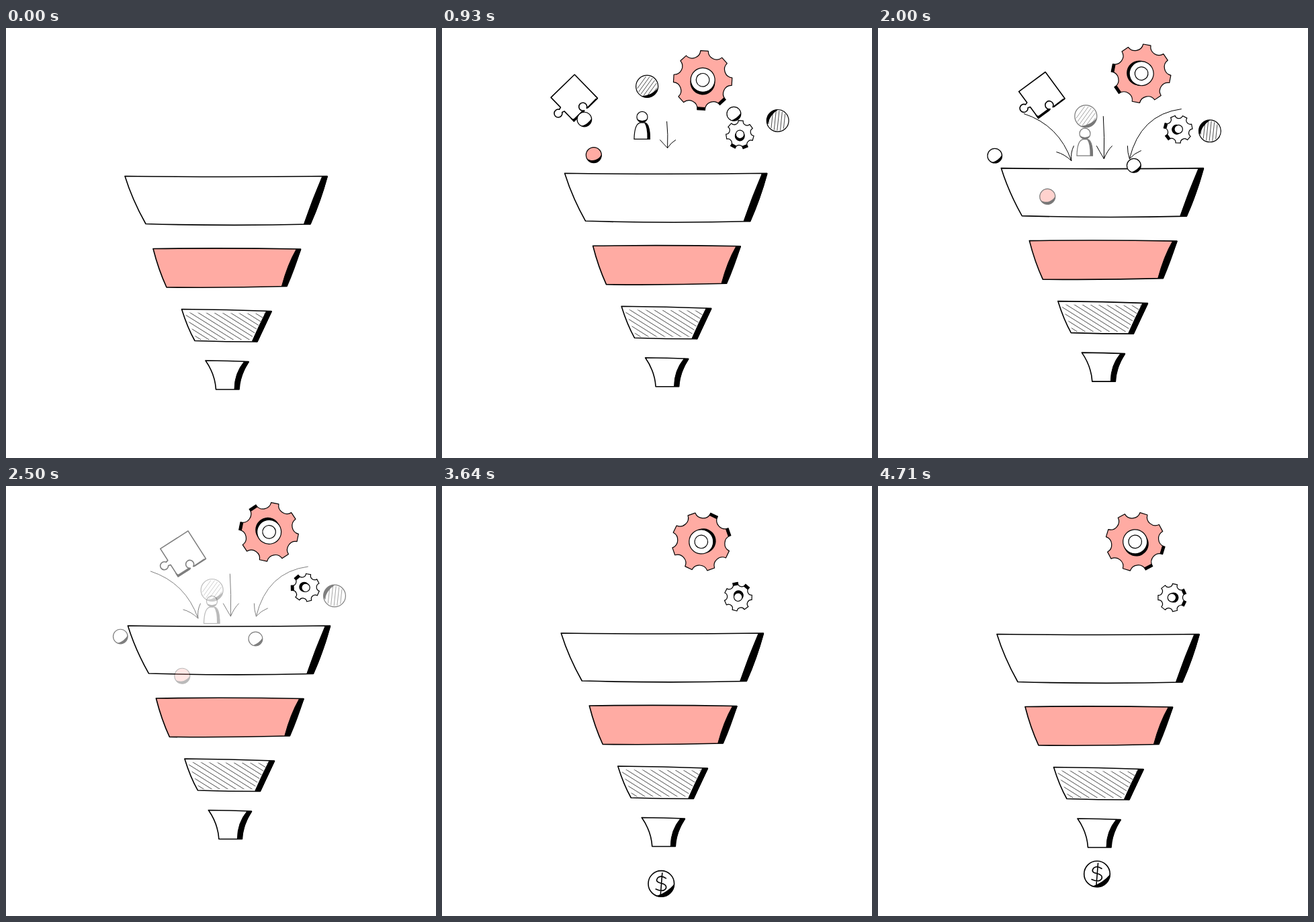
Recreate the animation shown at these times as an HTML page. Size 640 by 640 pixels, loop 4.78 s.

```html
<!DOCTYPE html>
<html lang="en">
<head>
<meta charset="utf-8">
<title>Funnel</title>
<style>
  html, body { margin: 0; width: 100%; height: 100%; overflow: hidden; background: #fff; }
  svg { display: block; width: 100%; height: 100%; }
  .line { fill: none; stroke: #000; stroke-width: 1.2; stroke-linecap: round; stroke-linejoin: round; }
  .white { fill: #fff; }
  .pink { fill: #ffaba3; }
  .black { fill: #000; }
  .bold { stroke-width: 1.6; }
  .fine { stroke-width: 1; }
  .thin { stroke-width: .7; }
</style>
</head>
<body>
<svg viewBox="0 0 640 640" xmlns="http://www.w3.org/2000/svg">
  <clipPath id="hatchArea"><path d="M266 423.5L385 425L364.5 464H284Z"/></clipPath>
  <g id="scene"></g>
</svg>
<script>
const LOOP = 4780, STEP = LOOP / 67, FALL = 3000;
const scene = document.getElementById('scene');
const rad = deg => deg * Math.PI / 180;
const polar = (r, deg) => `${(r * Math.cos(rad(deg))).toFixed(2)} ${(r * Math.sin(rad(deg))).toFixed(2)}`;
const ramp = (t, a, b) => Math.max(0, Math.min(1, (t - a) / (b - a)));
const mix = (a, b, u) => a + (b - a) * u;
const easeInOut = u => (1 - Math.cos(Math.PI * u)) / 2;
const easeOut = u => 1 - (1 - u) ** 2;

// ---- drawing helpers ----
const path = (d, cls = '') => `<path class="${cls}" d="${d}"/>`;
const line = (d, cls = '') => path(d, 'line ' + cls);
const circle = (r, cls, x = 0, y = 0) => `<circle class="${cls}" cx="${x}" cy="${y}" r="${r}"/>`;

// Shadow between a rim arc and a flatter inner arc.
function crescent(r, a0, a1, flat = 2.5) {
  const p = polar(r, a0), q = polar(r, a1), R = r * flat;
  return path(`M${p}A${r} ${r} 0 0 1 ${q}A${R} ${R} 0 0 0 ${p}Z`);
}

function chords(r, deg, gap) {
  const c = Math.cos(rad(deg)), s = Math.sin(rad(deg));
  let d = '';
  for (let o = -r + gap; o < r; o += gap) {
    const half = Math.sqrt(r * r - o * o);
    d += `M${-o * s - half * c} ${o * c - half * s}L${-o * s + half * c} ${o * c + half * s}`;
  }
  return line(d, 'thin');
}

const ball = (r, cls, a0, a1, flat, hatch = '') =>
  circle(r, 'line ' + cls) + hatch + crescent(r, a0, a1, flat);

// The shaded side faces angle 0; the wheel sits slightly off its pivot.
function gear(teeth, r, half, notch, cls, hub, lean) {
  const pitch = 360 / teeth;
  let d = '', shade = '';
  for (let i = 0; i <= teeth; i++) {
    const a = (i + .5) * pitch;
    d += (i ? `A${notch} ${notch} 0 0 0 ` : 'M') + polar(r, a - half) + 'L' + polar(r, a + half);
  }
  for (const a of [-pitch / 2, pitch / 2]) {
    const lo = r - 2.5, hi = r + 1.2;
    shade += line(`M${polar(lo, a - half)}L${polar(hi, a - half)}L${polar(hi, a + half)}L${polar(lo, a + half)}Z`, 'black');
  }
  return `<g transform="translate(${polar(2.5, lean)})">${line(d, cls)}${shade}${hub}</g>`;
}

const tier = (outline, band, cls, extra = '') =>
  line(outline, 'bold ' + cls) + extra + line(band, 'black fine');

function slant() {
  let d = '';
  for (let x = 184; x < 390; x += 12) d += `M${x} 420l80 50`;
  return `<g clip-path="url(#hatchArea)">${line(d, 'thin')}</g>`;
}

// ---- artwork ----
const funnelArt =
  tier('M177 220.5Q327 222.5 478 220.5Q468 258 453 292Q330 295 208 291.5Q188 256 177 220.5Z',
    'M470.5 221.5L478.5 221Q468 259 453 292L443.5 291.5Q456 255 470.5 221.5Z', 'white') +
  tier('M219 328.5Q328 327 438.5 329Q429 359 418 384.5Q328 387 239 386Q227 360 219 328.5Z',
    'M432 329.5L439 329.5Q428 358 417.5 384.5L410.5 384Q419 352 432 329.5Z', 'pink') +
  tier('M261.5 418.5Q328 419 395 421.5L374 467Q328 467 281 465.5Q270 446 261.5 418.5Z',
    'M387.5 421.5L395.5 422L374 467L366.5 466Q376 444 387.5 421.5Z', 'white', slant()) +
  tier('M297 495Q330 495 361 496.5Q348 517 347 538H312.5Q311 515 297 495Z',
    'M354.5 496.5L361.5 497Q348 517 346.5 537.5H340Q340 514 354.5 496.5Z', 'white');

const puzzleArt =
  line('M-24.5 -24.5H24.5V-3.5L24 -2.5A6 6 0 1 0 24 2.5L24.5 3.5V24.5H4L3 28A6 6 0 1 1 -3 28L-4 24.5H-24.5Z', 'white bold') +
  path('M22 4H25.5V25.5H18L22 22.5ZM23 -22L25.5 -24.5V-4H23.5Z');

const personArt =
  line('M-12 33Q-11.5 9 -2 8.5H4Q11.5 10 11.5 33Z', 'white') +
  path('M3 8.5Q11.5 10 12 33H7.5Q8 15 3 8.5Z') +
  ball(8, 'white', 25, 155, 1.8);

const bigHub = circle(18.5, 'black', 3.3, 1.4) + circle(18, 'line white') + circle(9.8, 'line white');
const smallHub = circle(7.5, 'black', 2.6, 0) + circle(6.2, 'line white');

const coinArt =
  circle(19.3, 'line white bold') + crescent(19.8, 0, 112, 3) +
  line('M1.5 -16L-1 16M7 -8Q0 -13 -5 -9Q-10 -3 -1 -1Q9 1 7 7Q3 13 -8 8', 'bold');

// ---- motion ----
function add(art) {
  const g = document.createElementNS('http://www.w3.org/2000/svg', 'g');
  g.innerHTML = art;
  return scene.appendChild(g);
}

function pose(g, x, y, more, alpha) {
  g.setAttribute('transform', `translate(${x} ${y}) ${more}`);
  g.setAttribute('opacity', alpha);
}

// The whole scene sways: up and right, then back down to rest at 4 s.
function sway(t) {
  const u = Math.min(t / 4000, 1);
  const lift = t < 2380 ? easeInOut(t / 2380) : easeInOut(1 - ramp(t, 2380, 4000));
  return [7.1 * Math.sin(Math.PI * u ** .72) ** 2, -12.7 * lift];
}

const bezier = (a, b, c, u) => mix(mix(a, b, u), mix(b, c, u), u);
const appear = t => ramp(t, 0, 300);
const movers = [];

// Drift along a straight or bent path, fading away before the fall ends.
function drift(art, fadeFrom, from, to, bend, turn = [0, 0]) {
  const g = add(art), mid = bend || from.map((v, i) => (v + to[i]) / 2);
  movers.push(t => {
    const u = Math.min(t / FALL, 1);
    const [x, y] = from.map((v, i) => bezier(v, mid[i], to[i], u));
    pose(g, x, y, `rotate(${mix(...turn, u)})`, appear(t) * (1 - ramp(t, fadeFrom, FALL)));
  });
}

function spin(art, x, y, start, speed, stop) {
  const g = add(art);
  movers.push(t => pose(g, x, y, `rotate(${start + speed * Math.min(t, stop)})`, appear(t)));
}

// Arrows stretch downwards from their tails.
function arrow(d, x, y, from) {
  const g = add(`<path class="line fine" vector-effect="non-scaling-stroke" d="${d}"/>`);
  movers.push(t => {
    const grow = ramp(t, from, from + 800);
    pose(g, x, y, `scale(1 ${Math.max(grow, .001)})`, grow ? 1 - ramp(t, LATE, FALL) : 0);
  });
}

const EARLY = 1100, LATE = 2000;

const coin = add(coinArt);
movers.push(t => {
  const y = mix(490, 597, easeOut(ramp(t, 2600, 3300))) - 19.5 * ramp(t, 3400, 4710);
  pose(coin, 326, y, '', ramp(t, 2600, 2860));
});

add(funnelArt);

arrow('M0 0Q2 30 1 63M-10 44Q-5 53 1 63Q6 51 13 44', 329, 143.5, 430);
arrow('M0 0Q52 17 70.5 70M48.500 57Q60 60 70.5 70Q69 58 74 48', 211, 139.5, 960);
arrow('M0 0Q-61 8 -77 74M-80 55Q-80 65 -77 74Q-70 66 -60 62', 445, 132.5, 1100);

drift(puzzleArt, LATE, [151, 105], [281, 115], null, [39, 61]);
drift(ball(10.8, 'white', -8, 112), LATE, [279, 100], [175, 275], [132, 155]);
drift(ball(11.5, 'pink', -5, 150, 1.3), EARLY, [198, 133], [270, 328]);
drift(ball(16.5, 'white', 10, 118, 2.2, chords(14.5, -54, 4.6)), EARLY, [291, 46], [300, 192], [309, 119]);
drift(personArt, EARLY, [275, 108.5], [300, 199.5], [310, 154]);
spin(gear(8, 43.8, 7.5, 12.5, 'pink', bigHub, 120), 385, 82, -14, .0913, 4530);
spin(gear(7, 20.8, 10, 6, 'white', smallHub, 140), 439.3, 164.5, 28, .0705, LOOP);
drift(ball(10.4, 'white', -8, 112), LATE, [518, 20], [371, 253], [342, 230]);
drift(ball(16.4, 'white', 158, 272, 2.2, chords(14.5, 96, 4.6)), LATE, [499.6, 122], [481.6, 187]);

function draw(t) {
  scene.setAttribute('transform', `translate(${sway(t).join(' ')})`);
  for (const move of movers) move(t);
}

const start = performance.now();
function tick(now) {
  const t = Math.max(0, now - start) % LOOP;
  draw(Math.floor((t + 2) / STEP) % 67 * STEP);
  requestAnimationFrame(tick);
}
draw(0);
requestAnimationFrame(tick);
</script>
</body>
</html>
```
